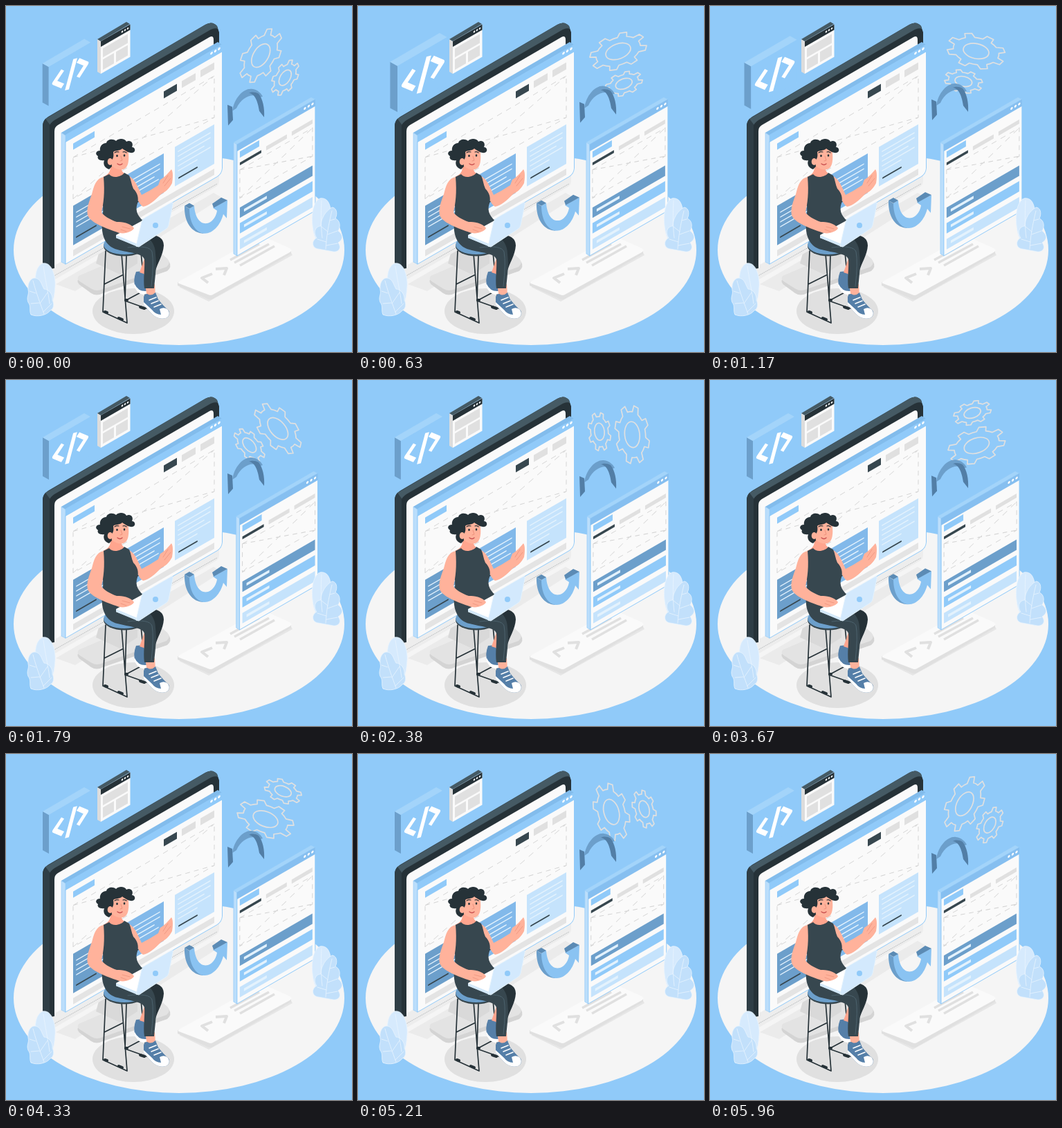
These frames come from a looping animation (500x500 px, 6000 ms). An HTML page:

```html
<!DOCTYPE html>
<html lang="en">
<head>
<meta charset="utf-8">
<title>Responsive web design</title>
<style>
  html, body { margin: 0; width: 100%; height: 100%; overflow: hidden; background: #90caf9; }
  svg { display: block; width: 100vw; height: 100vh; }
  .line { fill: none; stroke-linecap: round; stroke-linejoin: round; }
  .dash { fill: none; stroke: #d5d5d5; stroke-dasharray: 7 6; }
  .gear path, .gear circle { fill: none; stroke: #e0e0e0; stroke-width: 1.7; vector-effect: non-scaling-stroke; }
</style>
</head>
<body>
<svg viewBox="0 0 500 500">
  <ellipse cx="250" cy="352.500" rx="239" ry="137.500" fill="#f5f5f5"/>

  <!-- monitor -->
  <g>
    <path d="M72 402L300 270 312 277 100 412Z" fill="#ebebeb"/>
    <path d="M105 394Q101 399 108 404L123 415Q131 420 140 415L233 383Q240 377 236 370L215 350Z" fill="#d4d4d4"/>
    <path d="M105 390Q101 395 108 399L124 409Q131 413 140 409L232 377Q239 371 233 365L210 345Z" fill="#e3e3e3"/>
    <path d="M136 350L130 372 165 388 190 372V330Z" fill="#d9d9d9"/>
    <path d="M64 372L308 232V253Q308 259 302 262L64 399Z" fill="#ededed"/>
    <path d="M66 392L305 257" stroke="#a9adb0" stroke-width="1" stroke-dasharray="1 1"/>
    <path d="M53 371V174Q53 165 61 160L288 27Q298 21 305 29L308 38V60L70 190V379L64 380Z" fill="#263238"/>
    <path d="M57 163L288 27Q298 21 305 29L306 33Q302 31 296 34L70 165Q64 169 62 174Z" fill="#455a64"/>
    <path d="M53 371V174Q53 167 57 163L63 171V378Z" fill="#2f3e46"/>
    <path d="M70 375V181Q70 175 75 172L294 45Q300 42 300 49V245Z" fill="#fafafa"/>
  </g>

  <!-- desktop page -->
  <g>
    <path d="M80 183L86 187V373L80 370Z" fill="#bbdefb" stroke="#90caf9" stroke-width=".6"/>
    <path d="M80 183L306 52 312 56 86 187Z" fill="#82bcec"/>
    <g transform="matrix(1 -.577 0 1 86 196)">
      <path d="M0 0H226.500V169Q226 177 219 177H0Z" fill="#fafafa" stroke="#90caf9"/>
      <path d="M0-10H226.500V1H0Z" fill="#90caf9"/>
      <g fill="#fff"><circle cx="211" cy="-6" r="1.800"/><circle cx="216.500" cy="-6" r="1.800"/><circle cx="222" cy="-6" r="1.800"/></g>
      <path d="M11 9H42V18H11Z" fill="#90caf9"/>
      <path d="M142 9.500H161V19.500H142Z" fill="#37474f"/>
      <path d="M168 9.500H188V19.500H168ZM195 9.500H215V19.500H195Z" fill="#e0e0e0"/>
      <path class="dash" d="M11 29H215V89H11ZL215 89M11 89L215 29"/>
      <path d="M11 99H68V156H11Z" fill="#6c9fcb"/>
      <path d="M84 99H142V156H84Z" fill="#82b9ea"/>
      <path d="M158 99H215V156H158Z" fill="#c5e3fc"/>
      <path class="line" stroke="#e3f2fd" stroke-width="1.600"
        d="M16 111H62M16 118H62M16 125H56M16 132H60M89 111H136M89 118H136M89 125H128M89 132H134M163 108H209M163 115H209M163 122H200M163 129H209M163 136H190"/>
      <path class="line" d="M16 147H44M89 147H118M164 147H190" stroke="#37474f" stroke-width="2"/>
      <path d="M11 163H215V172H11Z" fill="#e4e4e4"/>
    </g>
  </g>

  <!-- small browser window -->
  <g>
    <path d="M132 48L137 51V98L132 95Z" fill="#dcdcdc"/>
    <path d="M132 48L174 23 179 26 137 51Z" fill="#455a64"/>
    <g transform="matrix(1 -.577 0 1 137 51)">
      <path d="M0 0H42.500V47H0Z" fill="#fafafa"/>
      <path d="M0 0H42.500V8H0Z" fill="#263238"/>
      <g fill="#fff"><circle cx="31" cy="4" r="1.300"/><circle cx="35" cy="4" r="1.300"/><circle cx="39" cy="4" r="1.300"/></g>
      <path d="M3 12H39V25H3ZM3 28H19V43H3ZM22 28H39V43H22Z" fill="#e0e0e0"/>
    </g>
  </g>

  <!-- code tile -->
  <g id="tile">
    <path d="M53 83L62 88V144L53 139Z" fill="#6c9fcb"/>
    <path d="M53 83L113 48 122 53 62 88Z" fill="#a3d4fa"/>
    <g transform="matrix(1 -.577 0 1 62 88)">
      <path d="M0 0H60V56H0Z" fill="#90caf9"/>
      <path d="M20 16L8 27 20 39M38 10L26 48M42 15L54 27 42 39" class="line" stroke="#fff" stroke-width="6" style="stroke-linecap:butt"/>
    </g>
  </g>

  <g id="gears"></g>

  <!-- keyboard -->
  <g>
    <path d="M250 406L293 427 414 360 408 350Z" fill="#e6e6e6"/>
    <path d="M248 399V404L293 424Q296 425 299 423L412 358V352Z" fill="#e0e0e0"/>
    <path d="M250 398L364 335Q369 332 374 334L410 350Q415 353 410 356L299 417Q296 419 292 417L250 401Q247 400 250 398Z" fill="#fafafa"/>
    <path d="M298 387L283 393 292 400M303 380L319 379 315 389" class="line" stroke="#e0e0e0" stroke-width="4" style="stroke-linecap:butt"/>
    <path d="M324 367L366 344M330 371L380 344M338 375L388 347" stroke="#e0e0e0" stroke-width="3.500"/>
  </g>

  <!-- phone page -->
  <g id="phone">
    <path d="M329 197L334 200V361L329 358Z" fill="#bbdefb" stroke="#90caf9" stroke-width=".6"/>
    <path d="M329 197L441 132 447 135 334 200Z" fill="#a3d4fa"/>
    <g transform="matrix(1 -.577 0 1 334 200)">
      <path d="M0 0H113V161H0Z" fill="#fafafa" stroke="#90caf9"/>
      <path d="M0 0H113V10H0Z" fill="#86bff0"/>
      <g fill="#fff"><circle cx="98" cy="4.500" r="1.700"/><circle cx="103.500" cy="4.500" r="1.700"/><circle cx="109" cy="4.500" r="1.700"/></g>
      <path d="M4 12.500H32V21.500H4Z" fill="#90caf9"/>
      <path d="M4 28.500H35V32.500H4Z" fill="#37474f"/>
      <path d="M42 27H72V33H42ZM79 27H109V33H79Z" fill="#e0e0e0"/>
      <path class="dash" d="M4 39H109V80H4ZL109 80M4 80L109 39"/>
      <path d="M4 93.500H109V108.500H4Z" fill="#6c9fcb"/>
      <path d="M4 116H109V131H4Z" fill="#90caf9"/>
      <path d="M4 139H109V154H4Z" fill="#c5e3fc"/>
      <path d="M10 101H43M10 123.500H43M10 146.500H43" stroke="#e3f2fd" stroke-width="4"/>
    </g>
  </g>

  <!-- swap arrows -->
  <g id="arrows">
    <path d="M320 143L327 146 328 165 321 173Z" fill="#527ea6"/>
    <path d="M327 152C330 133 343 119 355 120 364 121 369 127 371 131L365 133C359 125 341 130 333 148Z" fill="#6c9fcb"/>
    <path d="M351 126C360 127 364 139 366 152L373 161C374 148 371 134 365 127 360 124 355 124 351 126Z" fill="#527ea6"/>
    <path d="M258 289L266 294C267 311 274 323 286 329 269 329 257 313 258 289Z" fill="#6c9fcb"/>
    <path d="M265 293L272 289C273 306 281 317 292 314 300 311 304 303 305 296L299 292 320 281 319 307 314 301C310 317 299 329 287 329 273 328 265 312 265 293Z" fill="#8ac3f2"/>
    <path d="M258 289L265 285 272 289 265 293ZM298 286L311 277 320 281 300 292Z" fill="#5b8bb5"/>
  </g>

  <!-- plants -->
  <g stroke="#e9f4fe" stroke-width=".8">
    <path d="M47 415C39 398 42 376 53 372 66 369 72 390 71 405 70 420 68 429 64 433Z" fill="#d6eafd"/>
    <path d="M36 446C33 439 37 435 32 428 29 420 34 417 32 410 31 399 36 393 42 393 50 394 51 402 55 409 62 409 68 417 67 425 70 430 69 438 64 440 59 447 45 450 36 446Z" fill="#c2e0fb"/>
    <path class="line" d="M54 376C57 397 61 414 63 430M39 397C44 416 50 431 55 445M43 415L34 412M48 429L36 430M49 430L60 414M54 442L66 430"/>
    <path d="M447 335C440 317 440 284 454 278 467 276 471 292 469 308L462 345Z" fill="#d6eafd"/>
    <path d="M451 351C442 350 441 339 449 335 443 326 448 318 455 318 455 307 462 296 471 291 477 291 480 299 476 307 484 311 483 320 480 325 489 332 486 338 480 342 486 350 480 356 473 355Z" fill="#c2e0fb"/>
    <path class="line" d="M456 281C455 301 455 320 457 335M471 296C466 316 463 334 462 351M468 310L475 308M465 326L456 319M465 330L479 325M463 341L450 337M463 346L479 343"/>
  </g>

  <!-- stool -->
  <ellipse cx="184" cy="441" rx="59" ry="33" fill="#e0e0e0"/>
  <path class="line" d="M144 354L140 442 175 458 167 358M174 360L172 426 203 437 195 356M142 402L168 389M172 426L202 410" stroke="#263238" stroke-width="1.700"/>
  <path class="line" d="M143 442L146 443M163 451L168 453M173 425H175M194 435L200 437" stroke="#263238" stroke-width="4"/>
  <ellipse cx="171" cy="347" rx="30" ry="14.500" fill="#37474f"/>
  <ellipse cx="171" cy="345" rx="30" ry="14" fill="#6c9fcb"/>

  <!-- legs and shoes -->
  <path d="M188 384L199 383 202 402 203 415Q197 417 191 411L187 406Q183 397 188 384Z" fill="#557fa8"/>
  <path d="M186 402Q191 413 203 412V416Q197 419 190 413L186 407Z" fill="#fff"/>
  <path d="M201 362L202 388 193 385Z" fill="#ffa58e"/>
  <path d="M201 402H215L216 419 204 421Z" fill="#ffb29b"/>
  <path d="M199 420Q202 414 206 417 211 419 216 414L220 424Q228 434 235 440 239 447 231 451 220 454 211 445L199 432Z" fill="#557fa8"/>
  <path d="M222 438Q229 434 234 439 239 447 231 451 220 454 211 445L199 432V428L211 439Q216 446 224 446Z" fill="#fff"/>
  <path class="line" d="M207 425L217 421M210 430L220 426M214 435L224 431" stroke="#fff" stroke-width="1.600"/>
  <path d="M190 340L205 330Q228 331 228 346C227 361 219 370 215 386L205 365Z" fill="#263238"/>
  <path d="M139 309C137 329 142 347 161 352 179 357 197 357 200 366 201 378 198 394 200 408H214C216 386 218 376 216 358 216 341 204 332 192 324L191 306Z" fill="#37474f"/>
  <path class="line" d="M176 349Q207 345 211 355 214 371 210 405" stroke="#4c626d" stroke-width="1"/>

  <!-- body -->
  <path d="M175 245C185 247 190 260 196 273 204 269 212 264 220 259L223 251C230 247 234 242 239 236 242 240 241 250 240 256 236 264 230 269 224 272 215 281 206 289 198 290 191 286 188 273 184 266Z" fill="#ffb29b"/>
  <path class="line" d="M227 256L234 245M229 260L238 249" stroke="#ed927c" stroke-width=".8"/>
  <path d="M140 247C149 243 151 239 151 231V218H167V236C168 242 174 243 178 245L170 254H151Z" fill="#ffa58e"/>
  <path d="M141 247L149 243C154 250 167 247 171 241L178 245C181 251 181 258 184 264 190 270 192 277 190 285 187 293 188 302 199 311L177 326C159 326 140 322 139 310 143 291 136 270 141 247Z" fill="#37474f"/>

  <!-- laptop -->
  <path d="M159 331L199 309 207 320 190 347 159 335Z" fill="#fff"/>
  <path d="M159 331L190 344V348L159 335Z" fill="#d4e9fa"/>
  <path d="M188 347L196 312Q197 308 201 306L239 284Q242 283 241 287L235 317Q234 321 230 323L192 348Z" fill="#d3e9fd" stroke="#e3f2fd"/>
  <circle cx="216" cy="317" r="4" fill="#90caf9"/>
  <path d="M141 247C130 249 127 260 124 272 120 283 116 293 118 302 121 313 146 322 161 327 170 331 183 326 185 321 179 313 168 312 160 312 150 309 140 302 138 298 141 285 143 270 141 247Z" fill="#ffb29b"/>
  <path class="line" d="M168 319L179 322M166 323L174 326" stroke="#ed927c" stroke-width=".8"/>

  <!-- head -->
  <path d="M151 207C160 198 174 200 176 207 178 216 178 229 173 234 167 239 157 236 151 229Z" fill="#ffb29b"/>
  <path d="M149 236C142 234 140 228 142 223 136 224 131 221 133 217 128 214 130 209 136 209 135 203 139 198 145 198 146 193 154 191 159 195 164 190 172 192 174 196 180 193 185 198 182 204 187 204 188 211 183 212 178 213 172 209 168 206 164 210 158 208 155 211 156 217 155 221 152 223L153 232Z" fill="#263238"/>
  <ellipse cx="150.500" cy="225" rx="3.800" ry="5" fill="#ffb29b"/>
  <g fill="#263238"><ellipse cx="160.500" cy="216.500" rx="1.300" ry="1.700"/><ellipse cx="171" cy="216" rx="1.300" ry="1.700"/></g>
  <path class="line" d="M157 212Q160 210 163 211M169 211Q172 210 174 212" stroke="#263238" stroke-width="1.200"/>
  <path class="line" d="M166 217L168 223 165 224" stroke="#ed927c"/>
  <path class="line" d="M161 228Q165 231 168 228" stroke="#c94f4f" stroke-width="1.300"/>
</svg>
<script>
const LOOP = 6000;
const LEAD = 25;
const tile = document.getElementById('tile');
const gears = document.getElementById('gears');
const phone = document.getElementById('phone');
const arrows = document.getElementById('arrows');

// Eight-toothed wheel, laid on the isometric wall.
function gear(x, y, radius, hole) {
  const teeth = 8, step = 2 * Math.PI / teeth;
  const root = radius * 0.78;
  const corners = [[0.23, root], [0.34, radius], [0.66, radius], [0.77, root]];
  const at = (a, r) => `${(r * Math.cos(a)).toFixed(2)} ${(r * Math.sin(a)).toFixed(2)}`;
  let d = '';
  for (let i = 0; i < teeth; i++) {
    corners.forEach(([offset, r], k) => {
      const point = at((i + offset) * step, r);
      if (k === 0 && i > 0) d += `A${root} ${root} 0 0 1 ${point}`;
      else d += (d ? 'L' : 'M') + point;
    });
  }
  d += `A${root} ${root} 0 0 1 ${at(corners[0][0] * step, root)}Z`;
  return `<g class="gear" transform="matrix(.866 -.5 0 1 ${x} ${y})">` +
    `<path d="${d}" stroke-linejoin="round"/><circle r="${hole}"/></g>`;
}
gears.innerHTML = gear(368, 72, 35, 15.3) + gear(404, 103, 23, 10.2);

// Linear interpolation through [position, value] stops.
function track(stops, p) {
  const i = Math.max(1, stops.findIndex(s => s[0] >= p));
  const [p0, v0] = stops[i - 1], [p1, v1] = stops[i];
  return v0 + (v1 - v0) * (p - p0) / (p1 - p0);
}
const beat = [[0, 1], [.1, 1.2], [.3, 1], [.4, 1], [.5, 1.2], [.6, 1], [1, 1]];
const shake = [[0, 0], [.1, -1], [.2, 2], [.3, -4], [.4, 4], [.5, -4],
  [.6, 4], [.7, -4], [.8, 2], [.9, -1], [1, 0]];
const float = [[0, 0], [.5, -10], [1, 0]];

function draw(ms) {
  const p = ((ms + LEAD) % LOOP) / LOOP;
  const half = p * 2 % 1;
  gears.setAttribute('transform', `rotate(${360 * p} 381 80)`);
  tile.setAttribute('transform',
    `translate(87.5 95) scale(${track(beat, p)}) translate(-87.5 -95)`);
  phone.setAttribute('transform', `translate(${track(shake, half)} 0)`);
  arrows.setAttribute('transform', `translate(0 ${track(float, half)})`);
}

const start = performance.now();
function tick() {
  draw(performance.now() - start);
  requestAnimationFrame(tick);
}
tick();
</script>
</body>
</html>
```
